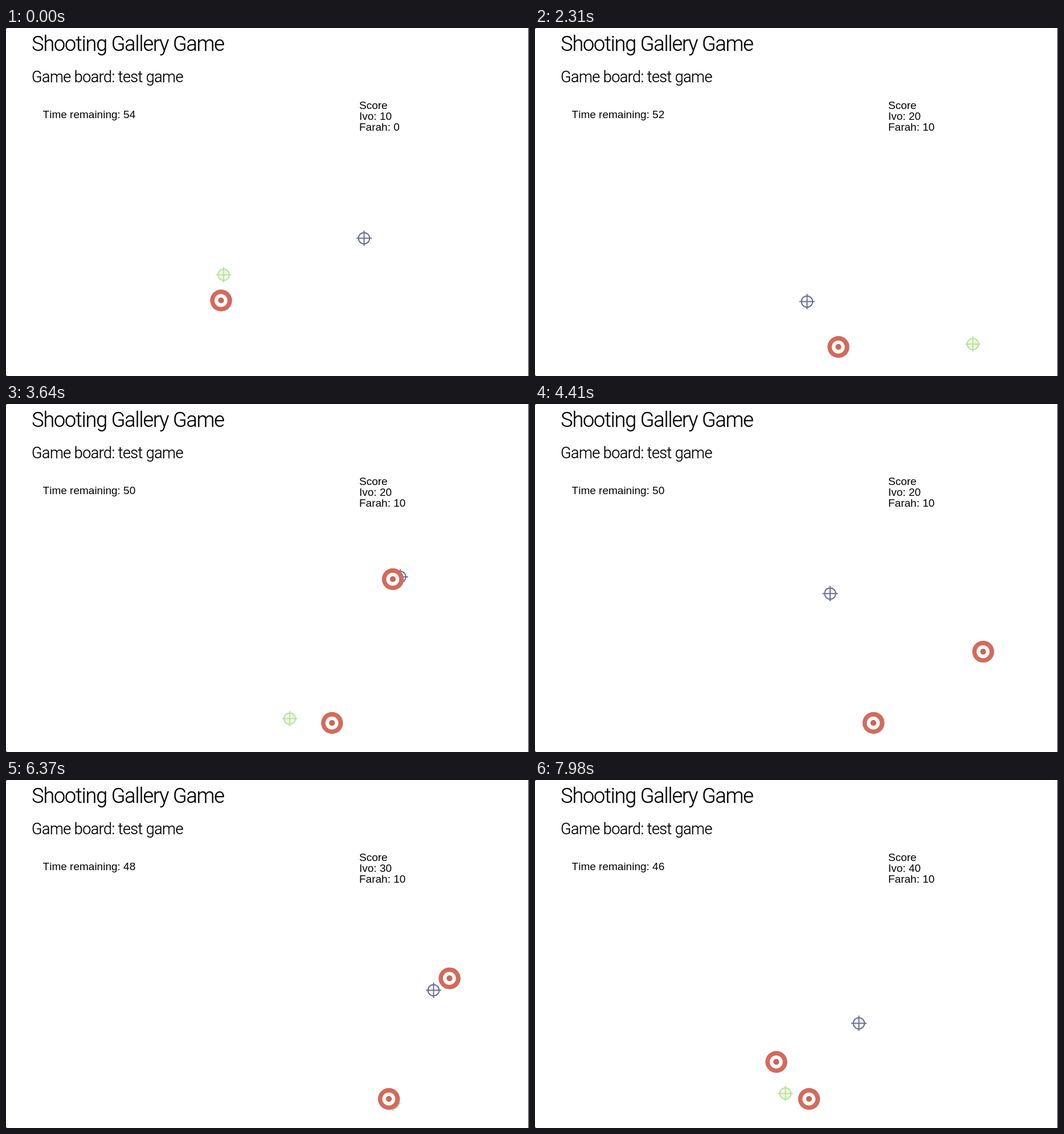
An HTML page that plays this animation: 918 by 610 pixels, repeating every 8 s.

```html
<!DOCTYPE html>
<html lang="en">
<head>
<meta charset="utf-8">
<title>Shooting Gallery Game</title>
<style>
  html, body { margin: 0; width: 100%; height: 100%; overflow: hidden; background: #fff; }
  svg { display: block; width: 918px; height: 610px; }
  .head { font-family: Roboto, "Liberation Sans", sans-serif; font-weight: 300; stroke: #000; stroke-width: .3; }
  .board { font: 19px "Liberation Sans", Arial, sans-serif; font-kerning: none; }
  .sight { fill: none; stroke-width: 2; }
</style>
</head>
<body>
<svg viewBox="0 0 918 610">
  <defs>
    <radialGradient id="glow">
      <stop offset=".5" stop-color="#effae2"/>
      <stop offset="1" stop-color="#effae2" stop-opacity="0"/>
    </radialGradient>
    <path id="cross" d="M-13.5 0H13.5M0-13.5V13.5M-9.8 0a9.8 9.8 0 1 0 19.6 0a9.8 9.8 0 1 0-19.6 0"/>
    <g id="disc">
      <circle cx=".3" cy=".2" r="19.1" fill="#93908f"/>
      <circle cx="-.3" r="18.8" fill="#d96858"/>
      <circle cx="-.2" r="11.6" fill="#c09e98"/>
      <circle cx="-.2" cy=".2" r="11.3" fill="#fff"/>
      <circle r="5.1" fill="#96716c"/>
      <circle cx="-.2" r="4.7" fill="#d06355"/>
    </g>
  </defs>

  <text class="head" x="45.2" y="40" font-size="36" letter-spacing="-1.12">Shooting Gallery Game</text>
  <text class="head" x="45" y="95" font-size="27" letter-spacing="-.53">Game board: test game</text>
  <g class="board">
    <text id="time" x="64.6" y="158"></text>
    <text x="620" y="142">Score</text>
    <text id="ivo" x="620" y="161"></text>
    <text id="farah" x="620" y="180"></text>
  </g>

  <g id="blue"><use href="#cross" class="sight" stroke="#696d99"/></g>
  <g id="green">
    <circle r="14" fill="url(#glow)"/>
    <use href="#cross" class="sight" stroke="#b7e2a0"/>
  </g>
  <g id="discs"></g>

  <path d="M917 0h1v610h-1z" fill="#111"/>
  <path d="M0 0h2L0 2zM0 610v-2l2 2z" fill="#555"/>
</svg>
<script>
const LOOP = 8000, STEP = 70;
const FALL = 165, DRAG = .052, WALL = 857, FLOOR = 559;  // px and seconds
const $ = id => document.getElementById(id);

// Both players rest their sights at the same beats.
const beats = [0, 980, 2310, 3640, 5180, 6370, 7980];
const sights = {
  blue: [[628.5, 368.5], [733, 347], [477.5, 479.5], [692, 303], [344, 361.5], [750.5, 368.5], [568.5, 426.5]],
  green: [[382, 432.5], [372.5, 475.5], [768.5, 554], [498, 551.5], [703, 553.5], [679, 567], [439.5, 549.5]]
};

// Launch place, sideways speed, lifetime and the player who hits it.
const discs = [
  { x: 377.5, y: 477.5, vx: 0, born: 0, shot: 140, by: "farah" },
  { x: 803, y: 307.6, vx: 37, born: 490, shot: 1680, by: "ivo" },
  { x: 492.3, y: 400, vx: 33, born: 1050, shot: 4480, by: "ivo" },
  { x: 598, y: 214.6, vx: 146.8, born: 3080, shot: LOOP },
  { x: 854, y: 220.5, vx: -100, born: 5600, shot: 7000, by: "ivo" },
  { x: 468, y: 344, vx: -50, born: 7070, shot: LOOP }
];

for (const d of discs) {
  d.el = document.createElementNS("http://www.w3.org/2000/svg", "use");
  d.el.setAttribute("href", "#disc");
  $("discs").append(d.el);
}

// Fall to the floor, slow down sideways, bounce off the right wall.
function fly(d, t) {
  const age = (t - d.born) / 1000;
  const x = d.x + d.vx * (1 - Math.exp(-DRAG * age)) / DRAG;
  return [WALL - Math.abs(WALL - x), Math.min(FLOOR, d.y + FALL * age)];
}

function aim(points, t) {
  const i = Math.max(1, beats.findIndex(b => b >= t));
  const u = (t - beats[i - 1]) / (beats[i] - beats[i - 1]);
  const ease = u * u * (3 - 2 * u);
  return points[i - 1].map((p, k) => p + (points[i][k] - p) * ease);
}

const place = (el, [x, y]) => el.setAttribute("transform", `translate(${x} ${y})`);

function draw() {
  const t = Math.floor(performance.now() % LOOP / STEP) * STEP;
  const score = { ivo: 10, farah: 0 };
  for (const id in sights) place($(id), aim(sights[id], t));
  for (const d of discs) {
    d.el.style.display = t >= d.born && t < d.shot ? "" : "none";
    place(d.el, fly(d, t));
    if (t >= d.shot) score[d.by] += 10;
  }
  $("time").textContent = "Time remaining: " + (54 - Math.floor((t + 500) / 1000));
  $("ivo").textContent = "Ivo: " + score.ivo;
  $("farah").textContent = "Farah: " + score.farah;
  requestAnimationFrame(draw);
}
draw();
</script>
</body>
</html>
```
